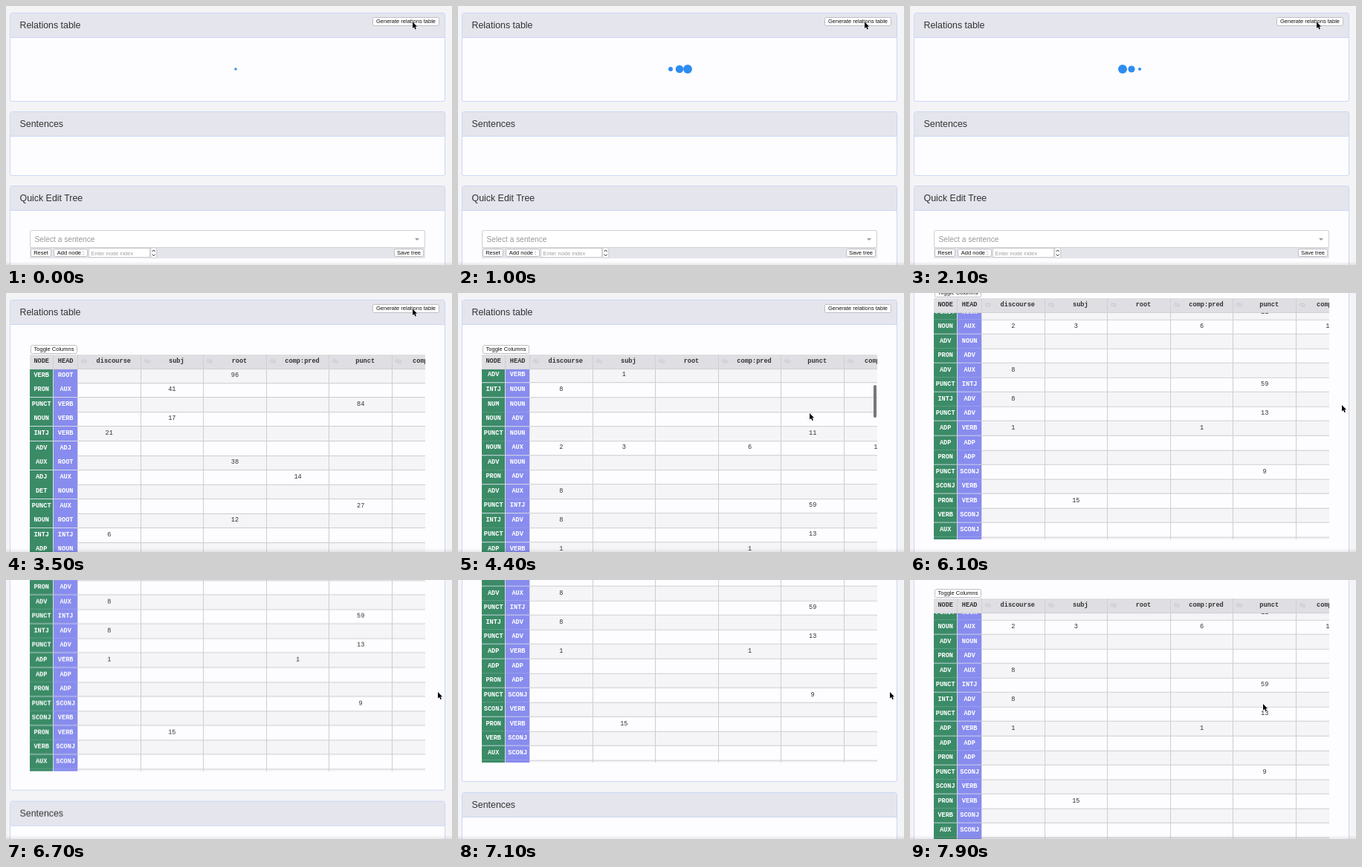
An HTML page that plays this animation: 600 by 349 pixels, repeating every 8000 ms.

```html
<!DOCTYPE html>
<html lang="en">
<head>
<meta charset="utf-8">
<title>Relations table</title>
<style>
* { box-sizing: border-box; }
html, body { margin: 0; width: 100%; height: 100%; overflow: hidden; background: #f4f4f6; }
body { position: relative; font-family: "Liberation Sans", Arial, sans-serif; color: #333; }
#page, .card, .title, .btn, .abs { position: absolute; }
#page { left: 0; top: 0; width: 600px; height: 800px; will-change: transform; }
.card { left: 5px; width: 586px; background: #fdfdff; border: 1px solid #ccd6f5; border-radius: 3px; overflow: hidden; }
.title { left: 0; top: 0; width: 100%; height: 33px; padding-left: 12.5px; font-size: 12.4px; line-height: 33px;
  background: #e4e5ed; border-bottom: 1px solid #ccd6f5; }
.btn { height: 11.5px; font-size: 7.5px; line-height: 10.5px; text-align: center; white-space: nowrap; color: #111;
  background: #fff; border: .6px solid #bfbfc4; border-radius: 2.5px; }
.dot { position: absolute; top: 78.5px; width: 12px; height: 12px; border-radius: 50%; background: #2e8df2; }
#view { left: 32px; top: 83px; width: 532px; height: 325px; overflow: hidden; font: 8.6px "Liberation Mono", monospace; }
#rows { position: absolute; top: 18.8px; left: 0; }
.row { display: grid; grid-template-columns: 32.4px 32.6px repeat(6, 84.6px); height: 19.56px; background: #fdfdff; }
.row:nth-child(odd) { background: #f5f4f7; }
.row > * { border: solid #cdcdd2; border-width: 0 1px 1px 0; line-height: 19px; text-align: center; white-space: nowrap; }
.row b { color: #fff; border-color: #d5dce6; }
.row b:first-child { background: #3b8b67; }
.row b:nth-child(2) { background: #888cee; }
#view .head { position: absolute; top: 0; left: 0; height: 18.8px; font-weight: bold; background: #dfdee2; }
.head span { position: relative; line-height: 18.5px; border-color: #d0d0d5; }
.head span:nth-child(n+3) { padding-left: 12px; }
.head svg { position: absolute; left: 3px; top: 5px; fill: none; stroke: #c6c6cb; }
#thumb { left: 527px; width: 4px; height: 44px; border-radius: 2px; background: #77777a; }
#shade { left: 0; right: 0; top: 344px; height: 5px; background: linear-gradient(#0000, #00000014); }
</style>
</head>
<body>
<div id="page">
  <div class="card" id="relations"><div class="title">Relations table</div></div>
  <div class="btn" style="left:493px;top:15.3px;width:90px">Generate relations table</div>
  <div id="loader">
    <i class="dot" style="left:280px"></i><i class="dot" style="left:291.6px"></i><i class="dot" style="left:303.2px"></i>
  </div>
  <div id="table">
    <div class="btn" style="left:33px;top:70px;width:63px">Toggle Columns</div>
    <div class="abs" id="view">
      <div id="rows"></div>
      <div class="row head" id="head"></div>
      <div class="abs" id="thumb"></div>
    </div>
  </div>
  <div class="abs" id="below" style="left:0;top:0">
    <div class="card" style="top:142px;height:87px"><div class="title">Sentences</div></div>
    <div class="card" style="top:242px;height:150px"><div class="title">Quick Edit Tree</div></div>
    <div class="abs" style="left:32px;top:325px;width:532px;height:15px;background:#e4e4eb"></div>
    <div class="abs" style="left:32px;top:301.5px;width:532px;height:24px;padding-left:5.5px;font-size:10.2px;line-height:23px;color:#999;background:#fff;border:1px solid #d0d0d4;border-radius:2px">Select a sentence</div>
    <div class="abs" style="left:550px;top:313px;border:3px solid transparent;border-top-color:#999"></div>
    <div class="btn" style="left:33px;top:326.5px;width:28px">Reset</div>
    <div class="btn" style="left:64px;top:326.5px;width:46px">Add node :</div>
    <div class="abs" style="left:111px;top:326px;width:83px;height:13px;padding-left:2.5px;font-size:7.5px;line-height:13px;color:#a0a0a4;background:#fff;border:.6px solid #d0d0d4;white-space:nowrap">Enter node index</div>
    <svg class="abs" style="left:194px;top:325px" width="10" height="16">
      <rect x=".7" y=".7" width="8" height="14" rx="3" fill="#fff" stroke="#bbb" stroke-width=".7"/>
      <path d="M2.7 6 4.7 3.7 6.7 6M2.7 9.5 4.7 11.8 6.7 9.5" fill="none" stroke="#333"/>
    </svg>
    <div class="btn" style="left:522px;top:326.5px;width:40px">Save tree</div>
  </div>
</div>
<div class="abs" id="shade"></div>
<svg class="abs" id="cursor" style="left:0;top:0;overflow:visible" width="8" height="11">
  <path d="M0 0V8.6L2 6.8 3.4 9.9 4.9 9.2 3.5 6.2H6.1Z" fill="#000" stroke="#fff" stroke-width=".8" paint-order="stroke"/>
</svg>
<script>
const $ = id => document.getElementById(id);

// node, head, then counts per relation column
const data = `VERB ROOT ,,96;PRON AUX ,41;PUNCT VERB ,,,,84;NOUN VERB ,17;INTJ VERB 21;ADV ADJ;AUX ROOT ,,38;
ADJ AUX ,,,14;DET NOUN;PUNCT AUX ,,,,27;NOUN ROOT ,,12;INTJ INTJ 6;ADP NOUN;NOUN NOUN;
ADV VERB ,1;INTJ NOUN 8;NUM NOUN;NOUN ADV;PUNCT NOUN ,,,,11;NOUN AUX 2,3,,6,,1;ADV NOUN;PRON ADV;ADV AUX 8;
PUNCT INTJ ,,,,59;INTJ ADV 8;PUNCT ADV ,,,,13;ADP VERB 1,,,1;ADP ADP;PRON ADP;PUNCT SCONJ ,,,,9;SCONJ VERB;
PRON VERB ,15;VERB SCONJ;AUX SCONJ;ADJ VERB;DET ADJ`;
$('rows').innerHTML = data.split(';').map(line => {
  const [node, head, counts = ''] = line.trim().split(' ');
  const values = counts.split(',');
  const cells = Array.from({length: 6}, (_, i) => `<span>${values[i] || ''}</span>`).join('');
  return `<div class="row"><b>${node}</b><b>${head}</b>${cells}</div>`;
}).join('');

const eye = '<svg width="10" height="8"><path d="M1 4Q5 0 9 4Q5 8 1 4M2 1 8 7" stroke-width=".8"/></svg>';
$('head').innerHTML = ['NODE', 'HEAD', 'discourse', 'subj', 'root', 'comp:pred', 'punct', 'comp:obj']
  .map((name, i) => `<span>${i > 1 ? eye : ''}${name}</span>`).join('');

// Eased value through [time, value] points
function track(points, t) {
  const i = points.findIndex(p => p[0] > t);
  if (i === 0) return points[0][1];
  if (i < 0) return points[points.length - 1][1];
  const [t0, a] = points[i - 1], [t1, b] = points[i];
  const x = (t - t0) / (t1 - t0);
  return a + (b - a) * x * x * (3 - 2 * x);
}

const LOADED = 2400;
const pageScroll = [[5500, 0], [5600, 14], [5850, 58], [6100, 76], [6650, 150], [7100, 162], [7350, 162], [7900, 58]];
const innerScroll = [[4000, 0], [4400, 273.8], [4850, 361.3]];
const thumbAlpha = [[3950, 0], [4050, 1], [5200, 1], [5450, 0]];
const cursorX = [[3550, 547], [3950, 473], [4950, 473], [5400, 581], [7150, 581], [7500, 475]];
const cursorY = [[3550, 21.5], [3950, 162], [4950, 162], [5400, 151], [7150, 151], [7500, 167]];
const dots = [...document.querySelectorAll('.dot')];

function draw(t) {
  const loaded = t >= LOADED;
  $('loader').style.display = loaded ? 'none' : '';
  $('table').style.display = loaded ? '' : 'none';
  $('relations').style.cssText = `top:9px;height:${loaded ? 425 : 120}px`;
  $('below').style.transform = `translateY(${loaded ? 306 : 0}px)`;

  dots.forEach((dot, i) => {
    const phase = (t + 920 + (2 - i) * 160) % 1400;
    const scale = phase < 1120 ? (1 - Math.cos(phase / 560 * Math.PI)) / 2 : 0;
    dot.style.transform = `scale(${scale})`;
  });

  const inner = track(innerScroll, t);
  $('page').style.transform = `translateY(${-track(pageScroll, t)}px)`;
  $('rows').style.transform = `translateY(${-inner}px)`;
  $('thumb').style.top = 2 + inner * .142 + 'px';
  $('thumb').style.opacity = track(thumbAlpha, t);
  $('cursor').style.transform = `translate(${track(cursorX, t)}px, ${track(cursorY, t)}px)`;
}

const start = performance.now();
function tick() {
  draw((performance.now() - start) % 8000);
  requestAnimationFrame(tick);
}
tick();
</script>
</body>
</html>
```
